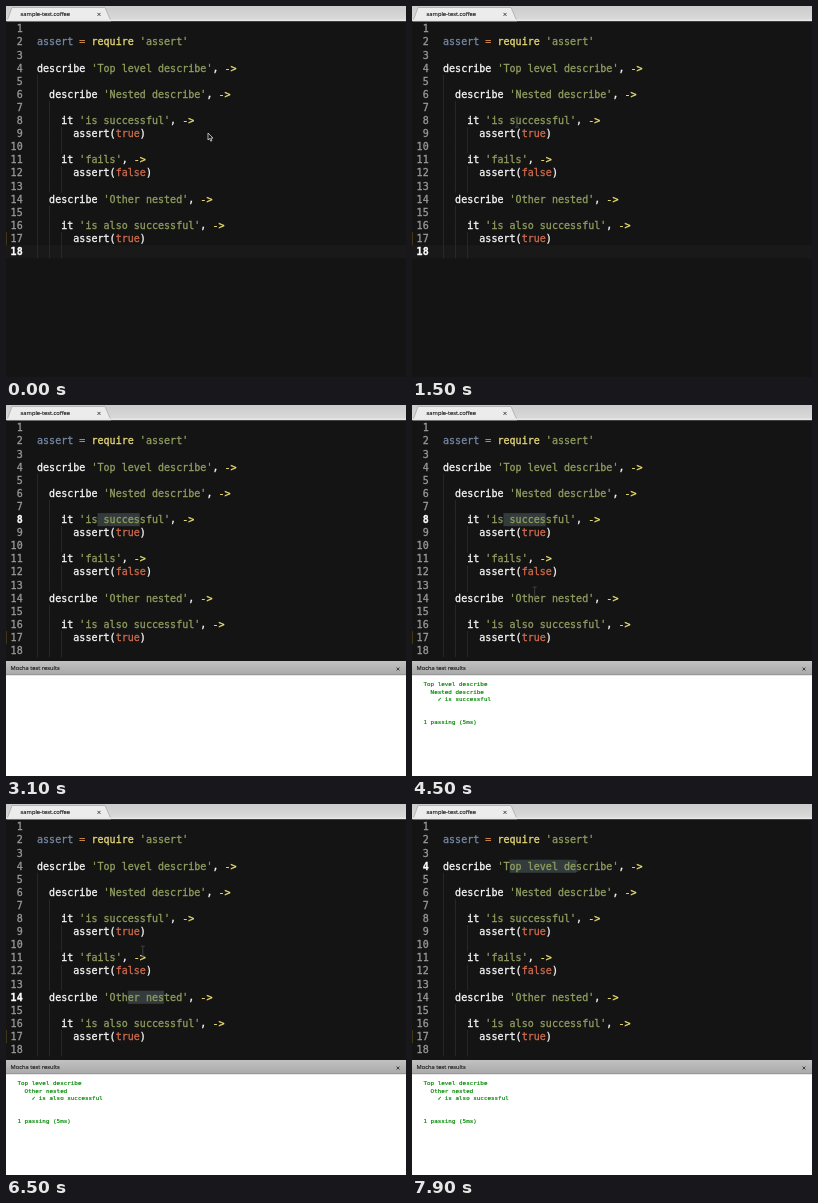
An HTML page with a canvas for the animation above (8 s loop, 400x371 px).

```html
<!DOCTYPE html>
<html lang="en">
<head>
<meta charset="utf-8">
<title>Test runner in an editor</title>
<style>
html, body { margin: 0; width: 400px; height: 371px; overflow: hidden; background: #141414; }
canvas { display: block; }
</style>
</head>
<body>
<canvas id="stage" width="400" height="371"></canvas>
<script>
const ctx = document.getElementById('stage').getContext('2d');
const LOOP = 8000, STEP = 100;
const LEFT = 31, TOP = 16.4, CHAR = 6.05, ROW = 13.1;
const MONO = '"DejaVu Sans Mono", monospace', SANS = '"Open Sans", sans-serif';

const code = `
assert = require 'assert'

describe 'Top level describe', ->

  describe 'Nested describe', ->

    it 'is successful', ->
      assert(true)

    it 'fails', ->
      assert(false)

  describe 'Other nested', ->

    it 'is also successful', ->
      assert(true)
`.split('\n');

// The first matching rule colours a token.
const rules = [
  [/^'/, '#8f9d5f'], [/^->/, '#f0e474'], [/^=/, '#cf8a4c'],
  [/^(true|false)/, '#cf6a4c'], [/^require/, '#e6d878'], [/./, '#f8f8f8'],
];

// Each step drags over some text, then presses a key to run the tests there.
const steps = [
  { line: 8, words: ' succes', start: 1600, end: 2100, key: 2700,
    group: 'Nested describe', test: 'is successful' },
  { line: 14, words: 'er nes', start: 4600, end: 4900, key: 4900,
    group: 'Other nested', test: 'is also successful' },
  { line: 4, words: 'op level de', start: 7600, end: 7900, key: Infinity },
];
const CLEAR = 400, REPORT = 800, HIDDEN = 1100;

// The pointer visits both ends of every drag.
const stops = [{ t: 0, x: 202, y: 127 }];
for (const s of steps) {
  s.x = LEFT + code[s.line - 1].indexOf(s.words) * CHAR;
  s.width = s.words.length * CHAR;
  s.top = TOP + (s.line - 1) * ROW;
  const y = s.top + ROW / 2;
  stops.push({ t: s.start, x: s.x, y }, { t: s.end, x: s.x + s.width, y, drag: true });
}

function rect(x, y, w, h, fill) {
  ctx.fillStyle = fill;
  ctx.fillRect(x, y, w, h);
}

function shade(y, h, from, to) {
  const g = ctx.createLinearGradient(0, y, 0, y + h);
  g.addColorStop(0, from);
  g.addColorStop(1, to);
  rect(0, y, 400, h, g);
}

function shape(outline, x, y, fill, stroke) {
  const path = new Path2D(outline);
  ctx.save();
  ctx.translate(x, y);
  ctx.fillStyle = fill;
  ctx.strokeStyle = stroke;
  ctx.lineWidth = 0.8;
  ctx.fill(path);
  ctx.stroke(path);
  ctx.restore();
}

// Text is set large and scaled down to keep fractional advances; a fine outline adds weight.
function text(str, x, y, size, fill, family = MONO, weight = '', align = 'left') {
  ctx.save();
  ctx.translate(x, y);
  ctx.scale(0.1, 0.1);
  ctx.font = `${weight} ${size * 10}px ${family}`;
  ctx.textAlign = align;
  ctx.fillStyle = ctx.strokeStyle = fill;
  ctx.lineWidth = size * 0.3;
  ctx.fillText(str, 0, 0);
  ctx.strokeText(str, 0, 0);
  ctx.restore();
}

const closeMark = (x, y) => shape('M-1.5-1.5l3 3M1.5-1.5l-3 3', x, y, 'none', '#222');

const indent = line => line.search(/\S|$/);

function guideDepth(i) {
  if (code[i]) return indent(code[i]);
  return Math.max(indent(code[i - 1] || ''), indent(code[i + 1] || ''));
}

function drawCode(t) {
  const step = steps.filter(s => t > s.start).pop();
  const active = step ? step.line : code.length;
  if (step) {
    const part = Math.min(1, (t - step.start) / (step.end - step.start));
    const chars = Math.round(step.words.length * part);
    rect(step.x, step.top, chars * CHAR, ROW, '#343b3d');
  } else {
    rect(0, TOP + (active - 1) * ROW, 400, ROW, '#191919');
  }
  code.forEach((line, i) => {
    const y = TOP + i * ROW, base = y + 9.9, on = i + 1 === active;
    for (let col = 0; col < guideDepth(i); col += 2)
      rect(LEFT + col * CHAR, y, 0.8, ROW, '#2c2c2c');
    text(i + 1, 16.7, base, 10.05, on ? '#fff' : '#999', MONO, on ? 'bold' : '', 'right');
    for (const m of line.matchAll(/'[^']*'|->|\w+|[^\w\s]/g)) {
      const assigned = m.index === 0 && line.includes('=');
      const color = assigned ? '#7587a6' : rules.find(r => r[0].test(m[0]))[1];
      text(m[0], LEFT + m.index * CHAR, base, 10.05, color);
    }
  });
  rect(0, TOP + 16 * ROW, 0.8, ROW, '#4a4012');
}

function drawTabs() {
  shade(0, 14, '#cbcbcb', '#dadada');
  shape('M1 15L6 1.5H99L105 15z', 0, 0, '#ececec', '#aaa');
  rect(0, 13.6, 400, 1.6, '#e8e8e8');
  text('sample-test.coffee', 14.6, 10.3, 5.75, '#222', SANS);
  closeMark(93, 8.4);
}

function drawPanel(t) {
  if (t < steps[0].key + CLEAR) return;
  rect(0, 256, 400, 115, '#fff');
  shade(256, 14, '#c2c2c2', '#a8a8a8');
  rect(0, 269.5, 400, 0.7, '#888');
  text('Mocha test results', 4.6, 265.1, 5.75, '#222', SANS);
  closeMark(392, 264);
  const run = steps.filter(s => t >= s.key + CLEAR).pop();
  if (t < run.key + REPORT) return;
  ['Top level describe', '  ' + run.group, '    ✓ ' + run.test, '', '', '1 passing (5ms)']
    .forEach((line, i) => text(line, 11.5, 281.1 + i * 7.6, 5.9, '#080'));
}

function drawPointer(t) {
  if (steps.some(s => t >= s.key && t < s.key + HIDDEN)) return;
  const k = Math.max(1, stops.findIndex(s => s.t >= t));
  const a = stops[k - 1], b = stops[k];
  const u = (t - a.t) / (b.t - a.t);
  const eased = b.drag ? u : u * u;
  const x = a.x + (b.x - a.x) * eased, y = a.y + (b.y - a.y) * eased;
  if (t <= 300) shape('M0 0v7l1.6-1.5 1.2 2.7 1.1-.5-1.1-2.6H5z', x, y, '#111', '#ddd');
  else shape('M-2-5h4M0-5v10M-2 5h4', x, y, 'none', '#484848');
}

function draw(now) {
  const t = Math.floor((now % LOOP) / STEP) * STEP;
  rect(0, 0, 400, 371, '#141414');
  drawCode(t);
  drawTabs();
  drawPanel(t);
  drawPointer(t);
}

const begin = performance.now();
function frame() {
  draw(performance.now() - begin);
  requestAnimationFrame(frame);
}
frame();
</script>
</body>
</html>
```
